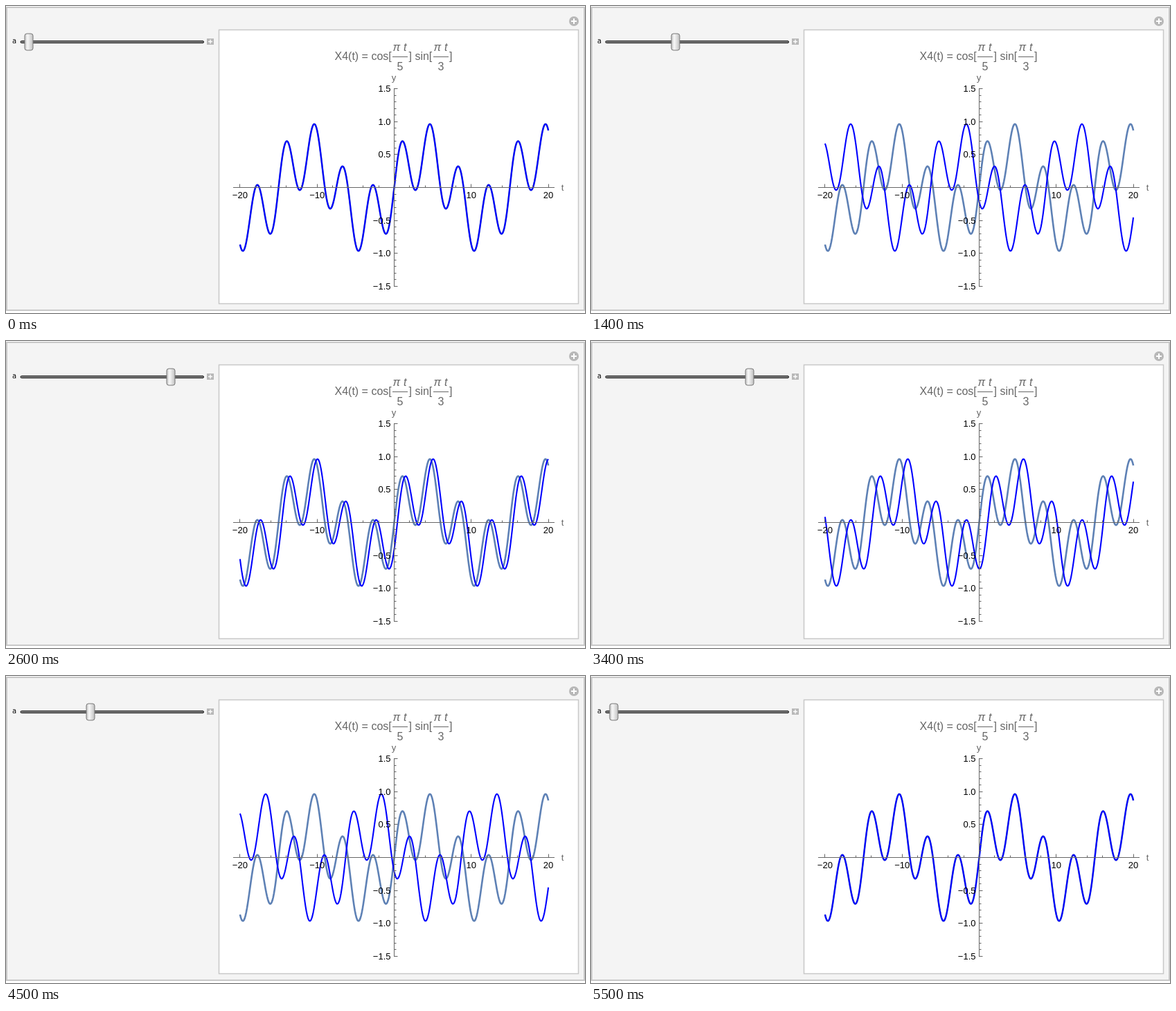
An HTML page for the animation above (6000 ms loop, 836x444 px).

```html
<!DOCTYPE html>
<html lang="en">
<head>
<meta charset="utf-8">
<title>Shifted product of cosine and sine</title>
<style>
  html, body { margin: 0; width: 100%; height: 100%; overflow: hidden; background: #fff; }
  svg { display: block; font: 13px "Liberation Sans", Arial, sans-serif; }
  .title { font-size: 16px; fill: #666; }
  .math { font-style: italic; }
  .mid { text-anchor: middle; }
  .end { text-anchor: end; }
  .axes { stroke: #666; fill: none; }
  .curve { fill: none; stroke-linejoin: round; }
</style>
</head>
<body>
<svg width="836" height="444" viewBox="0 0 836 444">
  <defs>
    <linearGradient id="metal">
      <stop offset="0" stop-color="#c4c4c4"/>
      <stop offset=".35" stop-color="#f8f8f8"/>
      <stop offset="1" stop-color="#c0c0c0"/>
    </linearGradient>
  </defs>
  <rect x="1" y="2" width="834" height="438" fill="#f4f4f4" stroke="#c8c8c8" stroke-width="2"/>
  <circle cx="820" cy="22" r="7" fill="#b8b8b8"/>
  <path d="M816 22h8M820 18v8" stroke="#fff" stroke-width="2"/>

  <text x="9" y="54" style="font: 10px 'DejaVu Sans', sans-serif">a</text>
  <rect x="21" y="50.5" width="264.5" height="3" rx="1.5" fill="#888" stroke="#111"/>
  <rect x="290" y="47" width="10" height="9" fill="#b8b8b8"/>
  <path d="M292 51.5h6M295 48.5v6" stroke="#fff" stroke-width="1.4"/>
  <rect id="thumb" x="-6" y="40" width="12" height="24" rx="3" fill="url(#metal)" stroke="#777"/>

  <rect x="307.5" y="34.5" width="519" height="396" fill="#fff" stroke="#c8c8c8" stroke-width="1.5"/>
  <path id="fixed" class="curve" stroke="#5e81b5" stroke-width="2.6"/>
  <path id="moving" class="curve" stroke="#00f" stroke-width="2.1"/>
  <g id="plot"></g>

  <g class="title">
    <text x="474.5" y="78">X4(t) = cos[</text>
    <text x="581.5" y="78">] sin[</text>
    <text x="640" y="78">]</text>
  </g>
</svg>
<script>
const $ = id => document.getElementById(id);
const X0 = 560.5, Y0 = 262.5;
const px = t => X0 + 11.13 * t;
const py = y => Y0 - 95.3 * y;
const signal = t => Math.cos(Math.PI * t / 5) * Math.sin(Math.PI * t / 3);

function curve(shift) {
  const points = [];
  for (let i = -200; i <= 200; i++) {
    const t = i / 10;
    points.push(px(t).toFixed(2) + ' ' + py(signal(t + shift)).toFixed(2));
  }
  return 'M' + points.join('L');
}

const text = (x, y, s, cls = '') => `<text x="${x}" y="${y}" class="${cls}">${s}</text>`;
const snap = v => Math.floor(v) + 0.5;

function axes() {
  let lines = `M328 ${Y0}H792M${X0} 119V406`, labels = '';
  for (let t = -20; t <= 20; t += 2) {
    const major = t % 10 === 0;
    lines += `M${snap(px(t))} ${Y0}v${major ? -5 : -3}`;
    if (major && t) labels += text(px(t), 278, String(t).replace('-', '−'), 'mid');
  }
  for (let i = -15; i <= 15; i++) {
    const major = i % 5 === 0;
    lines += `M${X0} ${snap(py(i / 10))}h${major ? 5 : 3}`;
    if (major && i) labels += text(555.5, py(i / 10) + 4.5, (i / 10).toFixed(1).replace('-', '−'), 'end');
  }
  return `<path class="axes" d="${lines}"/>` + labels;
}

function fraction(x, denominator) {
  return `<g class="title">${text(x - 10.5, 65, 'π', 'math')}${text(x + 5, 65, 't', 'math')}
    ${text(x, 93, denominator, 'mid')}<path class="axes" d="M${x - 11} 73.5h22"/></g>`;
}

$('plot').innerHTML = axes() + fraction(569, 5) + fraction(628, 3) +
  `<g fill="#666">${text(560, 108, 'y', 'mid')}${text(803.5, 267, 't', 'mid')}</g>`;
$('fixed').setAttribute('d', curve(0));

// The shift rises and falls linearly in 100 ms steps, resting at zero.
function draw() {
  const mid = Math.floor(performance.now() % 6000 / 100) * 100 + 50;
  const a = Math.max(0, 17 - 0.0069 * Math.abs(3000 - mid));
  $('moving').setAttribute('d', curve(a));
  $('thumb').setAttribute('transform', `translate(${Math.round(33 + 14.07 * a)})`);
  requestAnimationFrame(draw);
}
draw();
</script>
</body>
</html>
```
